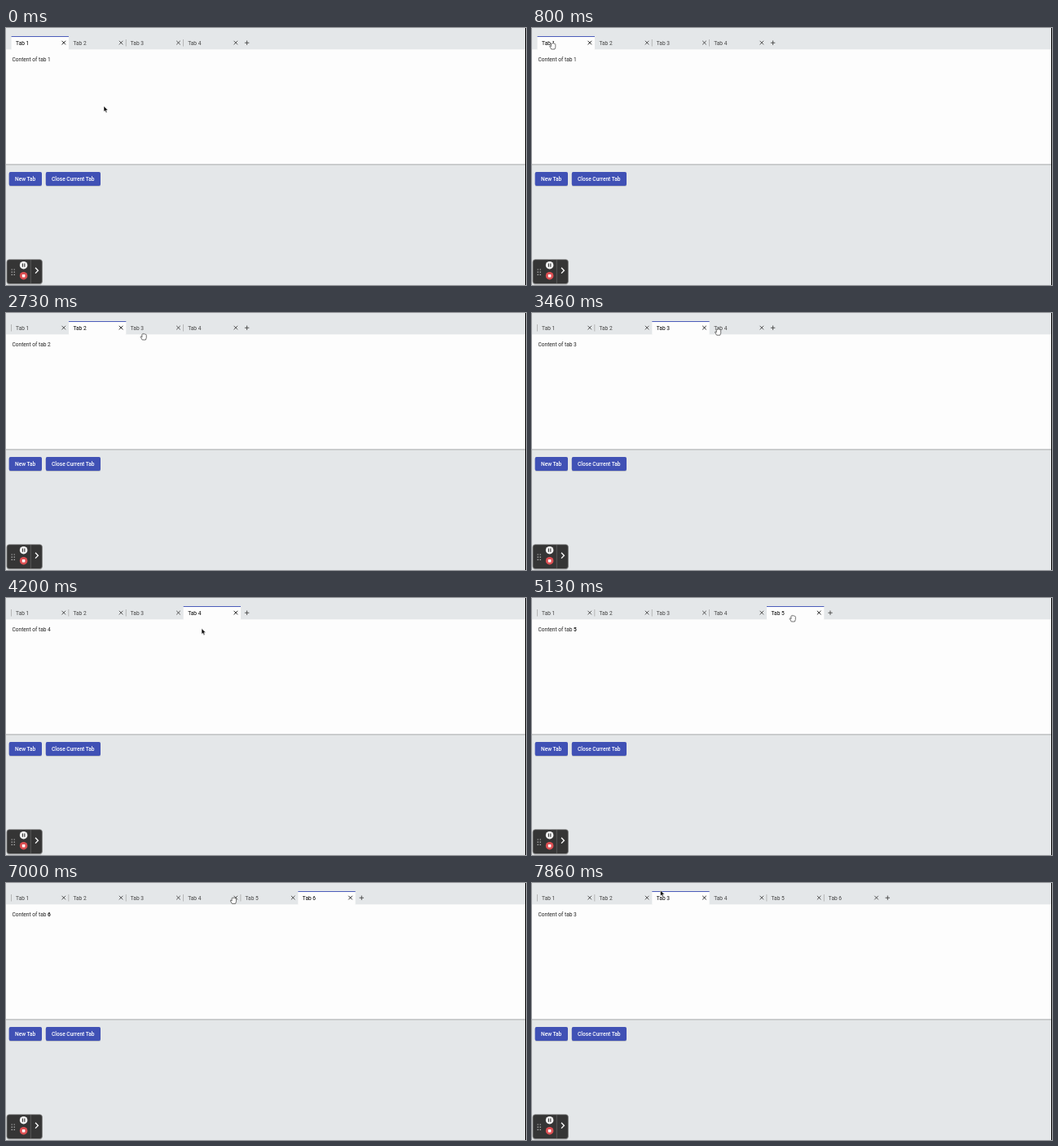
Recreate the animation shown at these times as an HTML page. Size 638 by 316 pixels, loop 8000 ms.

```html
<!DOCTYPE html>
<html lang="en">
<head>
<meta charset="utf-8">
<title>Tabs</title>
<style>
  html, body { margin: 0; width: 100%; height: 100%; overflow: hidden; background: #e4e7e9; }
  svg { display: block; width: 638px; height: 316px; }
  text { font: 6.6px Roboto, sans-serif; fill: #222; }
  .tab text { fill: #444; }
  .tab path { fill: none; stroke: #444; stroke-width: .9; }
  .tab .page, .tab .top { display: none; }
  .tab.on .page, .tab.on .top { display: inline; }
  .tab.on text { fill: #000; }
  .tab.on path { stroke: #111; }
  .button rect { fill: #3f51b5; }
  .button text { fill: #fff; font-weight: 500; }
  .bold { font-weight: 700; }
</style>
</head>
<body>
<svg viewBox="0 0 638 316">
  <defs>
    <filter id="shade" x="-20%" y="-30%" width="140%" height="170%">
      <feDropShadow dx="0" dy=".6" stdDeviation=".7" flood-opacity=".25"/>
    </filter>
  </defs>
  <rect width="638" height="316" fill="#e4e7e9"/>
  <rect y="167" width="637" height="1" fill="#b9bbbc"/>
  <rect y="168" width="637" height="1" fill="#cdcfd0"/>
  <rect y="26.3" width="637" height="140.9" fill="#fdfdfd"/>
  <g id="tabs"></g>
  <path id="plus" d="M-2.7 0H2.7M0-2.7V2.7" fill="none" stroke="#444" stroke-width=".9"/>
  <text x="7.5" y="41">Content of tab <tspan id="num">1</tspan></text>

  <g class="button" filter="url(#shade)">
    <rect x="3.7" y="177" width="40.3" height="17" rx="1.9"/><text x="11" y="187.8">New Tab</text>
  </g>
  <g class="button" filter="url(#shade)">
    <rect x="48.8" y="177" width="67.2" height="17" rx="1.9"/><text x="56" y="187.8">Close Current Tab</text>
  </g>

  <rect x="1" y="284.7" width="43.4" height="29.8" rx="3" fill="#363636" stroke="#8a8a8a" stroke-width=".7" filter="url(#shade)"/>
  <path d="M30.3 285V314" stroke="#626262" stroke-width=".8"/>
  <path d="M7.2 296.4v8M10.2 296.4v8" stroke="#ccc" stroke-width="1.2" stroke-dasharray="1.2 2"/>
  <circle cx="21.6" cy="291.7" r="4.8" fill="#f2f2f2"/>
  <path d="M20.4 289.6v4.2M22.8 289.6v4.2" stroke="#333" stroke-width="1.1"/>
  <circle cx="21.6" cy="304.7" r="4.8" fill="#dc4f52"/>
  <rect x="19.8" y="302.9" width="3.6" height="3.6" rx=".5" fill="#fff"/>
  <path d="M36 294.8l3.4 3.4-3.4 3.4" fill="none" stroke="#fff" stroke-width="1.3"/>

  <circle id="ring" cy="18" fill="none" stroke="#e0625f" stroke-width="1.9"/>
  <path id="arrow" d="M0 0V7L1.6 5.6 2.8 8.2 4 7.6 2.9 5.1H5.1Z" fill="#111" stroke="#fff" stroke-width=".5"/>
  <path id="hand" d="M-1.8 5L-3.8 1.5Q-4 .4-2.5 1L-2.1 1.6V-1.7Q-1.5-2.7-.8-1.8Q-.4-3.4.5-2.1Q1.3-3 1.9-1.6Q3-2.1 3.3-.7V2.4L2.4 5Z" fill="#fff" stroke="#444" stroke-width=".75" stroke-linejoin="round"/>
  <rect x="637" width="1" height="316"/>
</svg>
<script>
const LOOP = 8000, FPS = 15, MOVE = 500, FADE = 200;
const PITCH = 70.35, LEFT = 6.6, FIRST_TABS = 4;
const $ = id => document.getElementById(id);

// Pointer stops; a held press ends by selecting (or adding) the picked tab.
const stop = (at, x, y, pick = 0, hold = 0) => ({ at, x, y, pick, hold, end: at + hold });
const stops = [
  stop(0, 120, 96, 1),
  stop(460, 80, 22),
  stop(860, 22, 21),
  stop(1660, 23, 17),
  stop(1860, 94, 19, 2),
  stop(2740, 169, 28, 3, 120),
  stop(3600, 241, 21, 4, 260),
  stop(4200, 240, 37.5),
  stop(4530, 296, 20, 5, 200),
  stop(5130, 320, 24),
  stop(5740, 370.5, 20, 6, 460),
  stop(7270, 163, 21, 3, 190),
  stop(7860, 157.5, 9)
];

$('tabs').innerHTML = [1, 2, 3, 4, 5, 6].map((n, i) => `
  <g class="tab" transform="translate(${LEFT + i * PITCH} 0)">
    <rect class="page" y="10" width="${PITCH}" height="17" rx="1.5" fill="#fdfdfd"/>
    <rect class="top" y="10" width="${PITCH}" height="1" fill="#4c5dba"/>
    <rect class="line" x="-.5" y="14" width=".8" height="8.5" fill="#aaa"/>
    <text x="5.5" y="20.5">Tab ${n}</text>
    <path d="M61.9 15.8l4.6 4.6m0-4.6l-4.6 4.6"/>
  </g>`).join('');
const tabs = [...document.querySelectorAll('.tab')];

const clamp = v => Math.max(0, Math.min(1, v));
const mix = (a, b, u) => a + (b - a) * u;
const show = (el, on) => { el.style.display = on ? 'inline' : 'none'; };
const place = (el, x, y) => el.setAttribute('transform', `translate(${x} ${y})`);

function showPointer(t) {
  const i = stops.findIndex(s => s.at > t);
  const to = stops.at(i), from = i > 0 ? stops[i - 1] : to;
  const begin = Math.max(from.end, to.at - MOVE);
  const u = i > 0 ? clamp((t - begin) / (to.at - begin)) : 1;
  const ease = u * u * (3 - 2 * u);
  const x = mix(from.x, to.x, ease), y = mix(from.y, to.y, ease);
  const onTab = y > 12 && y < 30;
  for (const id of ['arrow', 'hand']) {
    place($(id), x, y);
    show($(id), onTab === (id === 'hand'));
  }
}

function showTabs(t) {
  const picks = stops.filter(s => s.pick && s.end <= t).map(s => s.pick);
  const active = picks.at(-1), count = Math.max(FIRST_TABS, ...picks);
  tabs.forEach((tab, i) => {
    const on = i + 1 === active;
    show(tab, i < count);
    tab.classList.toggle('on', on);
    tab.querySelector('text').setAttribute('y', on ? 20.9 : 20.5);
    show(tab.querySelector('.line'), !on && i !== active);
  });
  place($('plus'), 14.2 + count * PITCH, 18.2);
  $('num').textContent = active;
  $('num').setAttribute('class', active > FIRST_TABS ? 'bold' : '');
}

function showRing(t) {
  const press = stops.find(s => s.hold && t >= s.at && t < s.end + FADE);
  show($('ring'), press);
  if (!press) return;
  const swell = Math.sin(Math.PI * clamp((t - press.at) / 400));
  $('ring').setAttribute('cx', press.x);
  $('ring').setAttribute('r', 14.7 + 4 * swell);
  $('ring').style.opacity = 1 - clamp((t - press.end) / FADE);
}

function render(now) {
  // half a clock tick of slack keeps each step on its rounded time
  const t = Math.floor((now % LOOP + 7) * FPS / 1000) * 1000 / FPS % LOOP;
  showTabs(t);
  showRing(t);
  showPointer(t);
}

const start = performance.now();
function tick() {
  render(performance.now() - start);
  requestAnimationFrame(tick);
}
tick();
</script>
</body>
</html>
```
